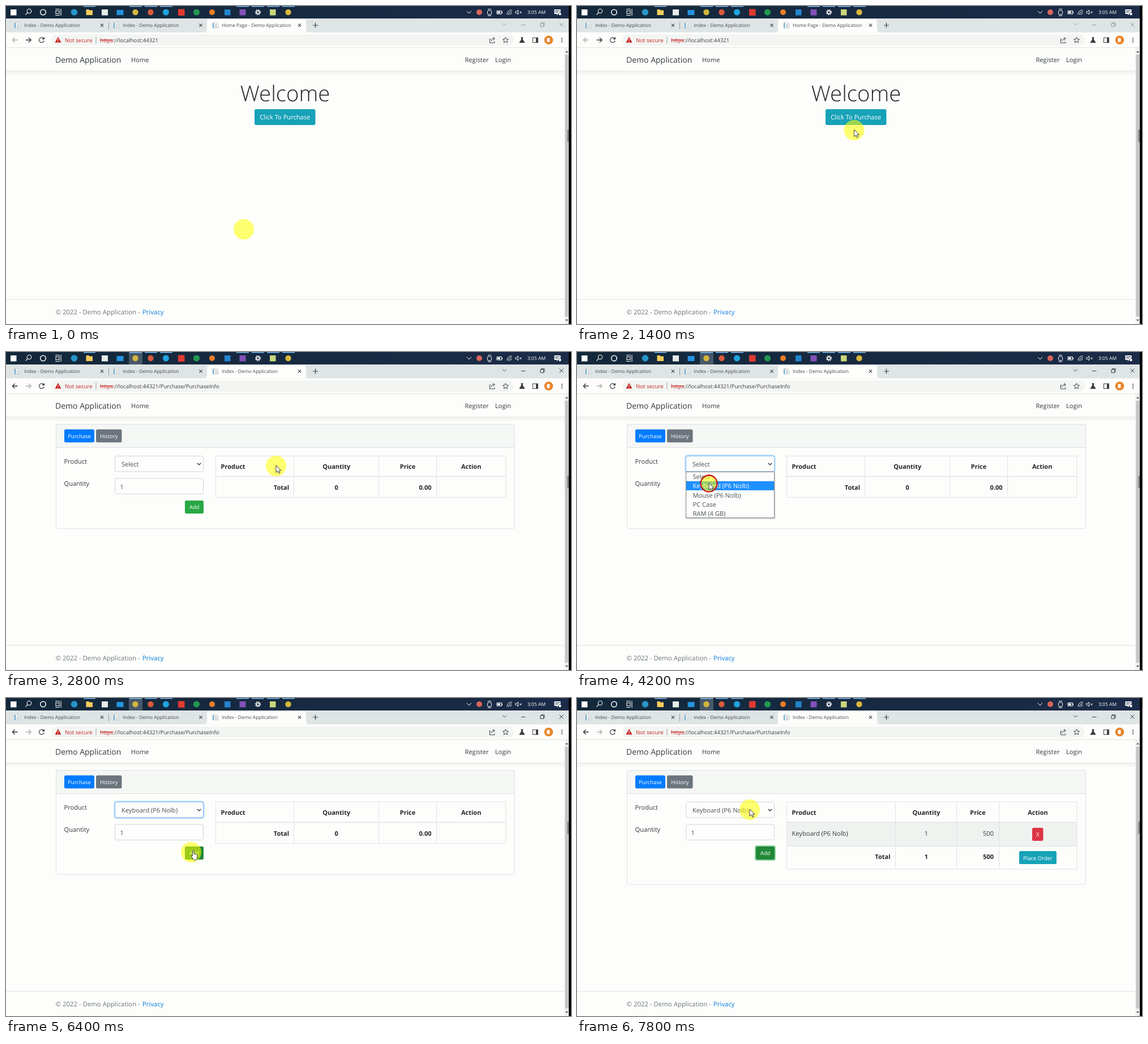
Recreate the animation shown at these times as an HTML page. Size 998 by 561 pixels, loop 8000 ms.

```html
<!DOCTYPE html>
<html lang="en">
<head>
<meta charset="utf-8">
<title>Demo Application</title>
<style>
html, body { margin: 0; width: 100%; height: 100%; overflow: hidden; background: #000; }
svg { display: block; width: 998px; height: 561px; }
text { font: 11.1px "Open Sans", "Noto Sans", sans-serif; fill: #343a40; text-rendering: geometricPrecision; }
.brand { font-size: 14px; }
.title { font-size: 38.3px; font-weight: 300; fill: #212529; }
.tab { font-size: 8.45px; fill: #45494d; }
.url { font-size: 9.65px; fill: #3c4043; }
.clock { font-size: 8.5px; }
.red { fill: #c5221f; }
.foot { font-size: 11.4px; fill: #6c757d; }
.link { fill: #0a7be0; }
.field { fill: #495057; }
.btn { font-size: 9.5px; fill: #fff; }
.white { fill: #fff; }
.bold text { font-size: 11px; font-weight: 700; fill: #212529; }
.mid { text-anchor: middle; }
.end { text-anchor: end; }
.line { fill: none; stroke: #dee2e6; }
.ico { fill: none; stroke: #fff; stroke-width: 1.1; }
.ui { fill: none; stroke: #3c4043; stroke-width: 1.2; }
.thin { stroke-width: 1; }

/* one loop is 8 s; 2.5% is one 200 ms beat */
.k { animation: 8s step-end infinite; }
.home { animation-name: home; }
.shop { animation-name: shop; }
.back { animation-name: back; }
.fwd { animation-name: fwd; }
.wake { animation-name: wake; }
.lit { animation-name: lit; }
.hover { animation-name: hover; }
.focus { animation-name: focus; }
.menu { animation-name: menu; }
.first { animation-name: first; }
.second { animation-name: second; }
.bar { animation-name: bar; }
.blank { animation-name: blank; }
.chosen { animation-name: chosen; }
.spin { animation-name: spin; }
.press { animation-name: press; }
.add { animation-name: add; }
.empty { animation-name: empty; }
.full { animation-name: full; }
.move { animation-name: move; }
.arrow { animation-name: arrow; }
.hand { animation-name: hand; }
.spot { animation-name: spot; }

@keyframes home { 0% { opacity: 1 } 27.5%, 100% { opacity: 0 } }
@keyframes shop { 0% { opacity: 0 } 27.5%, 100% { opacity: 1 } }
@keyframes back { 0% { opacity: .4 } 27.5%, 100% { opacity: 1 } }
@keyframes fwd { 0% { opacity: 1 } 27.5%, 100% { opacity: .4 } }
@keyframes wake { 0% { opacity: .45 } 22.5%, 100% { opacity: 1 } }
@keyframes lit { 0% { opacity: 0 } 22.5%, 100% { opacity: 1 } }
@keyframes hover { 0% { fill: #17a2b8 } 20% { fill: #138496 } 27.5%, 100% { fill: #17a2b8 } }
@keyframes focus { 0% { opacity: 0 } 45% { opacity: 1 } 82.5%, 100% { opacity: 0 } }
@keyframes menu { 0% { opacity: 0 } 45% { opacity: 1 } 55%, 100% { opacity: 0 } }
@keyframes first { 0% { fill: #fff } 50%, 100% { fill: #495057 } }
@keyframes second { 0% { fill: #495057 } 50%, 100% { fill: #fff } }
@keyframes bar { 0% { transform: none } 50%, 100% { transform: translateY(16px) } }
@keyframes blank { 0% { opacity: 1 } 55%, 100% { opacity: 0 } }
@keyframes chosen { 0% { opacity: 0 } 55%, 100% { opacity: 1 } }
@keyframes spin { 0% { opacity: 0 } 60% { opacity: 1 } 75%, 100% { opacity: 0 } }
@keyframes press { 0% { opacity: 0 } 82.5%, 100% { opacity: 1 } }
@keyframes add { 0% { fill: #28a745 } 77.5%, 100% { fill: #218838 } }
@keyframes empty { 0% { opacity: 1 } 87.5%, 100% { opacity: 0 } }
@keyframes full { 0% { opacity: 0 } 87.5%, 100% { opacity: 1 } }
@keyframes arrow {
  0% { opacity: 0 } 2.5% { opacity: 1 } 20% { opacity: 0 } 27.5% { opacity: 1 } 60% { opacity: 0 }
  75% { opacity: 1 } 77.5% { opacity: 0 } 90%, 100% { opacity: 1 }
}
@keyframes hand {
  0% { opacity: 0 } 20% { opacity: 1 } 27.5% { opacity: 0 } 77.5% { opacity: 1 } 90%, 100% { opacity: 0 }
}
@keyframes spot {
  0%, 25%, 47.5%, 55%, 85%, 100% { r: 18px; stroke-opacity: 0 }
  22.5%, 45%, 52.5%, 82.5% { r: 14.5px; stroke-opacity: 1 }
}
@keyframes move {
  0% { transform: translate(420px, 394px); animation-timing-function: steps(3) }
  7.5% { transform: translate(416px, 380px) }
  10% { transform: translate(416px, 380px); animation-timing-function: steps(3) }
  17.5% { transform: translate(489.5px, 219px); animation-timing-function: steps(2) }
  22.5% { transform: translate(477px, 201px) }
  35% { transform: translate(477px, 201px); animation-timing-function: steps(4) }
  45% { transform: translate(262px, 199px) }
  47.5% { transform: translate(258px, 201px) }
  50% { transform: translate(240px, 222px) }
  52.5% { transform: translate(233px, 232px) }
  55% { transform: translate(233px, 232px); animation-timing-function: steps(3) }
  62.5% { transform: translate(321px, 245px) }
  65% { transform: translate(310px, 240px) }
  67.5% { transform: translate(300px, 237px) }
  70% { transform: translate(300px, 237px); animation-timing-function: steps(4) }
  80% { transform: translate(327px, 272px) }
  87.5% { transform: translate(327px, 272px); animation-timing-function: steps(4) }
  97.5%, 100% { transform: translate(305px, 197px) }
}
</style>
</head>
<body>
<svg viewBox="0 0 998 561">
  <defs>
    <linearGradient id="night"><stop stop-color="#13283a"/><stop offset="1" stop-color="#1b2b48"/></linearGradient>
    <linearGradient id="shade" x2="0" y2="1"><stop stop-color="#000" stop-opacity=".05"/><stop offset="1" stop-color="#000" stop-opacity="0"/></linearGradient>
    <g id="page">
      <path d="M-4-5H2L5-2V5H-4Z" fill="#eef2f4" stroke="#b4bec4" stroke-width=".7"/>
      <path d="M-4-4V5" stroke="#4a9cc7" stroke-width="1.6"/>
      <path d="M-1-1H3M-1 1H3M-1 3H3" stroke="#a5b0b6" stroke-width=".7"/>
    </g>
    <path id="x" d="M-2.6-2.6L2.6 2.6M2.6-2.6L-2.6 2.6" stroke="#3c4043" stroke-width="1.1"/>
    <path id="left" d="M4.5 0H-4.5M-.5-4.2L-4.7 0L-.5 4.2" fill="none" stroke="#303336" stroke-width="1.3"/>
    <path id="down" d="M-3.2-1.6L0 1.6L3.2-1.6" fill="none" stroke="#343a40" stroke-width="1.4"/>
  </defs>

  <rect width="998" height="561" fill="#000"/>
  <rect width="994" height="561" fill="#fdfefb"/>

  <!-- taskbar -->
  <rect width="994" height="22" fill="url(#night)"/>
  <rect class="k lit" x="217" width="24" height="22" fill="#fff" fill-opacity=".22"/>
  <path d="M137 .7H158M218 .7H240M245 .7H267M272 .7H294M407 .7H429M434 .7H456M461 .7H483M488 .7H510" stroke="#76b9ed" stroke-width="1.4"/>
  <rect x="8" y="6" width="10.5" height="10.5" fill="#fff"/>
  <g class="ico">
    <circle cx="41" cy="9" r="3.7"/><path d="M38.3 11.7L34.5 15.5"/>
    <circle cx="65.5" cy="11" r="4.8" stroke-width="1.5"/>
    <path d="M88 8.5H94V13.5H88ZM88 6.5V5.500H94V6.5M88 15.5V16.5H94V15.5M97 5V17"/>
    <circle cx="445" cy="11" r="2.7" stroke-width="1.7"/>
    <circle cx="445" cy="11" r="4.4" stroke-width="1.5" stroke-dasharray="1.73"/>
  </g>
  <circle cx="120.5" cy="11" r="5.8" fill="#2795c9"/>
  <path d="M141.5 6H146L147.5 7.5H153V16H141.5Z" fill="#f6cc5a"/>
  <rect x="169" y="6" width="11" height="10.5" fill="#e6ece8"/>
  <rect x="195.5" y="7" width="12" height="9" fill="#2593df"/>
  <circle cx="228.5" cy="11" r="5.2" fill="#d2b63f"/>
  <circle cx="255.5" cy="11" r="5.2" fill="#d95a3c"/>
  <circle cx="282.5" cy="11" r="5.5" fill="#20a4df"/>
  <rect x="304" y="5.5" width="11.5" height="11.5" fill="#e03a30"/>
  <circle cx="336.5" cy="11" r="5.6" fill="#209950"/>
  <circle cx="364" cy="11" r="5" fill="#ed7d25"/>
  <rect x="386" y="6" width="10.5" height="10.5" fill="#2386cf"/>
  <rect x="412.5" y="6" width="11" height="10.5" fill="#8251b8"/>
  <rect x="466" y="6" width="10.5" height="10.5" fill="#c9d77c"/>
  <circle cx="498.5" cy="11" r="5.2" fill="#d8b83a"/>
  <g class="ico thin">
    <path d="M814 9L818 13L822 9"/>
    <rect x="850.5" y="8" width="7" height="7" rx="1.5"/><path d="M851 5.5H857M851 17H857"/>
    <path d="M867 8.5H875.5V14H867ZM876.5 10V12.5"/><path d="M868 11.2H873" stroke-width="3"/>
    <path d="M885 15A8 8 0 0 1 893.5 7M887.5 15.5A5.5 5.5 0 0 1 893.5 10M890 15.5A3 3 0 0 1 893.5 13"/>
    <path d="M900 9.5H902L904.5 7V15L902 12.5H900ZM907 9.5L910.5 13M910.5 9.5L907 13"/>
  </g>
  <circle cx="836" cy="11" r="5" fill="#d9655b"/>
  <text class="white clock" x="921" y="14">3:05 AM</text>
  <path d="M968.5 6H979.5V14H975L973 16.5V14H968.5Z" fill="#fff"/>
  <path d="M970 8.5H978M970 11H975" stroke="#1b2b48"/>
  <circle cx="978.5" cy="14" r="2.6" fill="#fff" stroke="#1b2b48" stroke-width=".8"/>

  <!-- tabs -->
  <rect y="22" width="994" height="24.5" fill="#dfe4e5"/>
  <path d="M350 46.5Q355 46.5 355 41V28Q355 23 360 23H525Q530 23 530 28V41Q530 46.5 535 46.5Z" fill="#fdfefb"/>
  <path d="M181.5 28V41" stroke="#90979b"/>
  <use href="#page" x="20" y="34"/><use href="#page" x="195" y="34"/><use href="#page" x="370" y="34"/>
  <text class="tab" x="32" y="37.3">Index - Demo Application</text>
  <text class="tab" x="206.5" y="37.3">Index - Demo Application</text>
  <text class="tab k home" x="381" y="37.3">Home Page - Demo Application</text>
  <text class="tab k shop" x="381" y="37.3">Index - Demo Application</text>
  <use href="#x" x="169.5" y="34"/><use href="#x" x="344" y="34"/><use href="#x" x="518.5" y="34"/>
  <path class="ui" d="M542 34H551M546.5 29.5V38.5"/>
  <path class="ui thin k wake" d="M877 30.5L880.5 34L884 30.5M910 33.5H917.5M944 31H949.5V36.5H944ZM945.5 31V29.5H951V35H949.5M977.5 29.5L984.5 36.5M984.5 29.5L977.5 36.5"/>

  <!-- address bar -->
  <rect x="80" y="50" width="817" height="20" rx="10" fill="#f3f5f3"/>
  <g class="k back"><use href="#left" x="16" y="60"/></g>
  <g class="k fwd"><use href="#left" transform="translate(39.5 60) scale(-1 1)"/></g>
  <path class="ui" d="M66.5 57.5A4.4 4.4 0 1 0 67.2 61"/><path d="M68 54.5V59H63.5Z" fill="#3c4043"/>
  <path d="M92 54.5L97.5 64.5H86.5Z" fill="#c5221f"/><path d="M92 58V61.3M92 62.2V63.4" stroke="#fff" stroke-width="1.1"/>
  <text class="url red" x="104" y="63.5">Not secure</text>
  <path d="M159 54V66" stroke="#9aa0a6"/>
  <text class="url" x="166" y="63.5"><tspan class="red" text-decoration="line-through">https</tspan>://localhost:44321</text>
  <text class="url k shop" x="269.3" y="63.5">/Purchase/PurchaseInfo</text>
  <g class="ui thin">
    <path d="M856 58H854.5V65H863V62.5M857 62Q857.5 57.5 862 57.5M860 55L863.5 57.5L860 60.5"/>
    <path d="M882.5 55L884 58.5L887.5 58.8L884.8 61.2L885.7 64.7L882.5 62.8L879.3 64.7L880.2 61.2L877.5 58.8L881 58.5Z"/>
    <path d="M909.5 55.5H913.5M910.5 55.5V59L907 64.5H916L912.5 59V55.5" fill="#3c4043"/>
    <rect x="930.5" y="56" width="9" height="8.5"/>
  </g>
  <rect x="936" y="56" width="3.5" height="8.5" fill="#3c4043"/>
  <circle cx="958.5" cy="60" r="7.8" fill="#e8852c"/>
  <rect x="955.5" y="56.5" width="5" height="7" rx="1" fill="#fff"/>
  <path d="M982 56V57.8M982 59.2V61M982 62.4V64.2" stroke="#3c4043" stroke-width="1.8"/>
  <path d="M0 73.5H994" stroke="#dfe3e2"/>

  <!-- page frame -->
  <text class="brand" x="87" y="100">Demo Application</text>
  <text x="221" y="99">Home</text>
  <text x="810.5" y="99">Register</text>
  <text x="864" y="99">Login</text>
  <path d="M0 114.5H986" stroke="#e6e9e7"/>
  <rect y="115" width="986" height="8" fill="url(#shade)"/>
  <path d="M0 517.5H986" stroke="#dee2e6"/>
  <text class="foot" x="87.5" y="544">© 2022 - Demo Application -</text>
  <text class="foot link" x="241" y="544">Privacy</text>
  <rect x="986" y="74" width="8" height="487" fill="#f1f2f1"/>
  <rect x="987.5" y="86" width="6" height="462" fill="#c3c5c5"/>
  <rect x="991" y="218" width="3" height="22" rx="1" fill="#8d9193"/>
  <path d="M988 82L990.5 79L993 82ZM988 553L990.5 556L993 553Z" fill="#505050"/>

  <!-- welcome -->
  <g class="k home">
    <text class="title mid" x="493" y="168">Welcome</text>
    <rect class="k hover" x="439" y="182" width="107.5" height="28" rx="3" fill="#17a2b8"/>
    <text class="white mid" x="492.7" y="200">Click To Purchase</text>
  </g>

  <!-- purchase -->
  <g class="k shop">
    <path d="M88.5 168.5V130.5Q88.5 127.5 91.5 127.5H895.5Q898.5 127.5 898.5 130.5V168.5Z" fill="#f5f7f5" stroke="#dcdfde"/>
    <rect class="line k empty" x="88.5" y="127.5" width="810" height="184" rx="3"/>
    <rect class="line k full" x="88.5" y="127.5" width="810" height="201.5" rx="3"/>
    <rect x="103" y="136.5" width="53" height="23" rx="2.5" fill="#007bff"/>
    <text class="btn mid" x="129.5" y="151.7">Purchase</text>
    <rect x="159" y="136.5" width="45.5" height="23" rx="2.5" fill="#6c757d"/>
    <text class="btn mid" x="181.8" y="151.7">History</text>

    <text x="102.5" y="196.5">Product</text>
    <text x="102.5" y="236">Quantity</text>
    <rect class="k focus" x="192.5" y="183.5" width="156" height="27.5" rx="3" fill="none" stroke="#007bff" stroke-opacity=".25" stroke-width="4.5"/>
    <rect x="192.5" y="183.5" width="156" height="27.5" rx="3" fill="#fdfefb" stroke="#ced4da"/>
    <rect class="k focus" x="192.5" y="183.5" width="156" height="27.5" rx="3" fill="none" stroke="#80bdff"/>
    <text class="field k blank" x="204" y="202">Select</text>
    <text class="field k chosen" x="204" y="202">Keyboard (P6 Nolb)</text>
    <use href="#down" x="341" y="197.5"/>
    <rect x="192.5" y="223" width="156" height="27.5" rx="3" fill="#fdfefb" stroke="#ced4da"/>
    <text class="field" x="201.5" y="242">1</text>
    <g class="k spin">
      <rect x="328" y="230" width="11" height="14" fill="#eceeec"/>
      <path d="M331 235.5L333.5 232.5L336 235.5ZM331 239L333.5 242L336 239Z" fill="#505050"/>
    </g>
    <rect class="k press" x="314" y="260" width="37" height="27" rx="4" fill="#28a745" fill-opacity=".5"/>
    <rect class="k add" x="316" y="262" width="33" height="23" rx="2.5" fill="#28a745"/>
    <text class="btn mid" x="332.5" y="277.3">Add</text>

    <g class="k empty">
      <path class="line" d="M370.5 183.5H883V256.5H370.5ZM508.5 183.5V256.5M658.5 183.5V256.5M760.5 183.5V256.5"/>
      <path class="line" d="M370.5 219.5H883" stroke-width="1.5"/>
      <g class="bold">
        <text x="379.5" y="206">Product</text>
        <text class="mid" x="583.7" y="206">Quantity</text>
        <text class="mid" x="709.5" y="206">Price</text>
        <text class="mid" x="821.7" y="206">Action</text>
        <text class="end" x="500" y="242.5">Total</text>
        <text class="mid" x="583.7" y="242.5">0</text>
        <text class="end" x="751.5" y="242.5">0.00</text>
      </g>
    </g>

    <g class="k full">
      <rect x="371" y="220" width="512" height="41" fill="#f0f2f0"/>
      <path class="line" d="M370.5 183.5H883V302H370.5ZM562.5 183.5V302M670.5 183.5V302M745.5 183.5V302M370.5 261.5H883"/>
      <path class="line" d="M370.5 219.5H883" stroke-width="1.5"/>
      <text x="379.5" y="242.5">Keyboard (P6 Nolb)</text>
      <text class="mid" x="617" y="242.5">1</text>
      <text class="end" x="736" y="242.5">500</text>
      <g class="bold">
        <text x="379.5" y="206">Product</text>
        <text class="mid" x="617" y="206">Quantity</text>
        <text class="mid" x="708" y="206">Price</text>
        <text class="mid" x="814" y="206">Action</text>
        <text class="end" x="553.5" y="283.5">Total</text>
        <text class="mid" x="617" y="283.5">1</text>
        <text class="end" x="736" y="283.5">500</text>
      </g>
      <rect x="804" y="229" width="19.5" height="23" rx="2.5" fill="#dc3545"/>
      <text class="btn mid" x="813.8" y="244.3">X</text>
      <rect x="781" y="270" width="66" height="23" rx="2.5" fill="#17a2b8"/>
      <text class="btn mid" x="814" y="285.5">Place Order</text>
    </g>

    <g class="k menu">
      <rect x="193" y="213" width="157.5" height="82" fill="#000" fill-opacity=".12"/>
      <rect x="192.5" y="211.5" width="156" height="81" fill="#fdfefb" stroke="#767b80"/>
      <rect class="k bar" x="193" y="212" width="155" height="16" fill="#1e90ff"/>
      <text class="field k first" x="204.5" y="224">Select</text>
      <text class="field k second" x="204.5" y="240.3">Keyboard (P6 Nolb)</text>
      <text class="field" x="204.5" y="256.5">Mouse (P6 Nolb)</text>
      <text class="field" x="204.5" y="272.5">PC Case</text>
      <text class="field" x="204.5" y="288.5">RAM (4 GB)</text>
    </g>
  </g>

  <!-- pointer -->
  <g class="k move">
    <circle class="k spot" r="18" fill="#ff0" fill-opacity=".56" stroke="#c8191b" stroke-width="2.4"/>
    <path class="k arrow" d="M0-1V11.5L2.9 8.8L4.9 13.2L6.9 12.3L5 8.1H8.8Z" fill="#fff" stroke="#222" stroke-width=".9"/>
    <path class="k hand" d="M2.7-1.8Q4-3.6 5.3-1.8V3L9.4 4Q11.3 4.5 11.1 6.5L10.6 10Q10.2 13.5 8.4 13.8H4.7L.6 7.5Q-.4 5.6 1.2 5.3L2.7 6.6Z" fill="#fff" stroke="#222" stroke-width=".9"/>
  </g>
</svg>
</body>
</html>
```
